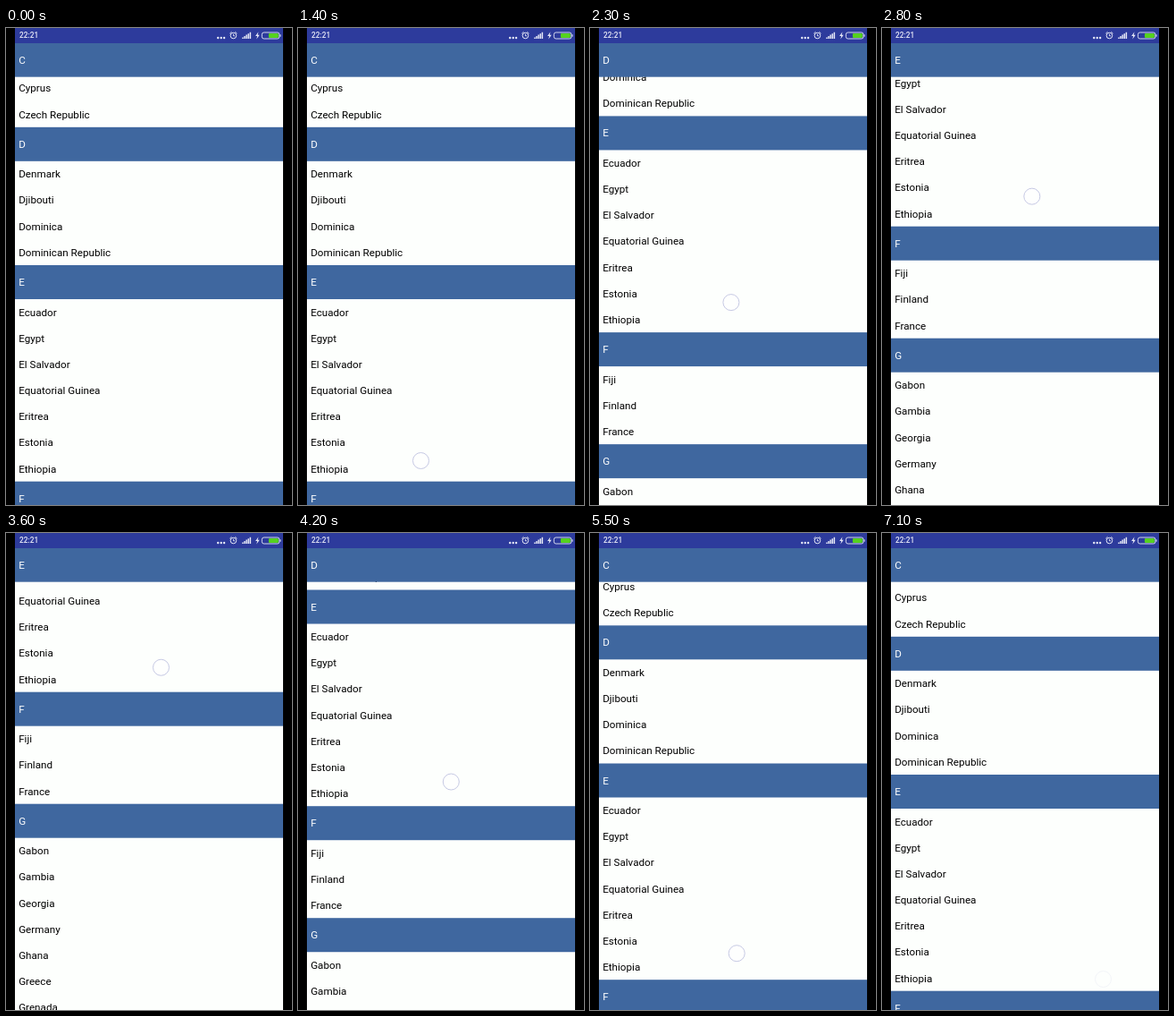
These frames come from a looping animation (320x533 px, 7200 ms). An HTML page:

```html
<!DOCTYPE html>
<html lang="en">
<head>
<meta charset="utf-8">
<title>Country list</title>
<style>
  html, body { margin: 0; width: 100%; height: 100%; overflow: hidden; background: #000; }
  #stage { position: absolute; left: 0; top: 0; width: 320px; height: 533px; overflow: hidden; background: #000; }
  #list { position: absolute; left: 10px; top: 0; width: 300px; height: 533px; overflow: hidden;
    background: #fdfffd; font: 11.67px Roboto, sans-serif; }
  .row, .head { position: absolute; left: 0; top: 0; width: 100%; box-sizing: border-box;
    padding: .5px 0 0 4.17px; white-space: nowrap; }
  .row { height: 29.17px; line-height: 29.17px; color: #000; }
  .head { height: 37.5px; line-height: 37.5px; color: #fff; background: #3f679f; z-index: 1; }
  #bar { position: absolute; left: 0; top: 0; width: 300px; height: 16.67px; z-index: 2; background: #2d3b9c; }
  #touch { position: absolute; left: 0; top: 0; width: 17px; height: 17px; margin: -10px 0 0 -10px;
    border: 1.5px solid #c6c9e4; border-radius: 50%; background: rgba(255, 255, 255, .55); z-index: 3; }
</style>
</head>
<body>
<div id="stage">
  <div id="list">
    <svg id="bar" viewBox="10 0 300 16.67" fill="#e6e8f6">
      <text x="15" y="11.3" font-family="Roboto, sans-serif" font-size="8.33" font-weight="500">22:21</text>
      <circle cx="237.3" cy="11" r="1.2"/><circle cx="240.8" cy="11" r="1.2"/><circle cx="244.2" cy="11" r="1.2"/>
      <g fill="none" stroke="#e6e8f6">
        <circle cx="254.5" cy="8.5" r="3.3"/>
        <path d="M250.4 6.2l2.2-2M258.6 6.2l-2.2-2M254.5 6.6v2.2h1.6" stroke-width=".9"/>
        <rect x="286.5" y="5" width="19.5" height="7" rx="2.2" stroke-width=".9"/>
      </g>
      <path d="M264.3 10.4h1.5v1.6h-1.5zM266.4 9h1.5v3h-1.5zM268.5 7.6h1.5v4.4h-1.5zM270.6 6.2h1.5v5.8h-1.5zM272.7 4.8h1.5v7.2h-1.5z"/>
      <path d="M282.6 4.3l-3.4 4.6h2.1l-.9 3.6 3.4-4.7h-2.1z"/>
      <rect x="294" y="6" width="11" height="5" rx="1" fill="#55d21e"/>
      <rect x="306.5" y="7.3" width="1.1" height="2.4"/>
    </svg>
  </div>
  <div id="touch"></div>
</div>
<script>
const LOOP = 7200, STEP = 100;
const BAR = 16.67, HEAD = 37.5, ROW = 29.17;
const countries = {
  C: ['', 'Cyprus', 'Czech Republic'],
  D: ['Denmark', 'Djibouti', 'Dominica', 'Dominican Republic'],
  E: ['Ecuador', 'Egypt', 'El Salvador', 'Equatorial Guinea', 'Eritrea', 'Estonia', 'Ethiopia'],
  F: ['Fiji', 'Finland', 'France'],
  G: ['Gabon', 'Gambia', 'Georgia', 'Germany', 'Ghana', 'Greece', 'Grenada', 'Guatemala', 'Guinea']
};

// time, list position, its speed per step, finger x, its speed per step
const keys = [
  [1500, 265, 0, 138, 1],
  [1900, 195.4, -25, 148.5, 2.6],
  [2800, -20, -24, 168.3, 1.6],
  [3600, -64, 20, 174, -.2],
  [4700, 164, 18, 169, -.6],
  [5500, 257.5, 5, 164.7, -.3],
  [6200, 270, 0, 164, 0]
];

const listEl = document.getElementById('list');
const touchEl = document.getElementById('touch');

function add(cls, text) {
  const el = document.createElement('div');
  el.className = cls;
  el.textContent = text;
  listEl.appendChild(el);
  return el;
}

function buildSections() {
  let y = 0;
  return Object.entries(countries).map(([letter, names]) => {
    const section = { y, head: add('head', letter) };
    y += HEAD;
    section.rows = names.map(name => {
      const row = { y, el: add('row', name) };
      y += ROW;
      return row;
    });
    return section;
  });
}

const sections = buildSections();
const anchor = sections[2].y;

function hermite(a, b, i, t) {
  const n = (b[0] - a[0]) / STEP, u = (t - a[0]) / (b[0] - a[0]), w = 1 - u;
  return a[i] * (1 + 2 * u) * w * w + a[i + 1] * n * u * w * w
       + b[i] * u * u * (3 - 2 * u) - b[i + 1] * n * u * u * w;
}

function track(t, i) {
  const last = keys[keys.length - 1];
  if (t <= keys[0][0]) return keys[0][i];
  if (t >= last[0]) return last[i];
  const k = keys.findIndex(key => key[0] > t);
  return hermite(keys[k - 1], keys[k], i, t);
}

function move(el, x, y) {
  el.style.transform = `translate(${x.toFixed(2)}px, ${y.toFixed(2)}px)`;
}

function drawList(pos) {
  const shift = pos - anchor;
  sections.forEach((s, i) => {
    const next = sections[i + 1];
    const pinned = next ? Math.min(BAR, next.y + shift - HEAD) : BAR;
    move(s.head, 0, Math.max(s.y + shift, pinned));
    for (const r of s.rows) move(r.el, 0, r.y + shift);
  });
}

function drawTouch(t, pos) {
  let alpha = 0;
  if (t >= 1400 && t < 6200) {
    // the list trails the finger slightly; the first few pixels do not scroll
    const speed = (track(t + 10, 1) - track(t - 10, 1)) * 5;
    const slop = 7 * Math.min(1, Math.max(0, (1700 - t) / 200));
    move(touchEl, track(t, 3), pos + 212 + slop + speed * .14);
    alpha = 1;
  } else if (t >= 6900) {
    move(touchEl, 248, 499);
    alpha = .9 - (t - 6900) / 200 * .7;
  }
  touchEl.style.opacity = alpha;
}

function frame() {
  const t = Math.floor(performance.now() % LOOP / STEP) * STEP;
  const pos = track(t, 1);
  drawList(pos);
  drawTouch(t, pos);
  requestAnimationFrame(frame);
}
frame();
</script>
</body>
</html>
```
